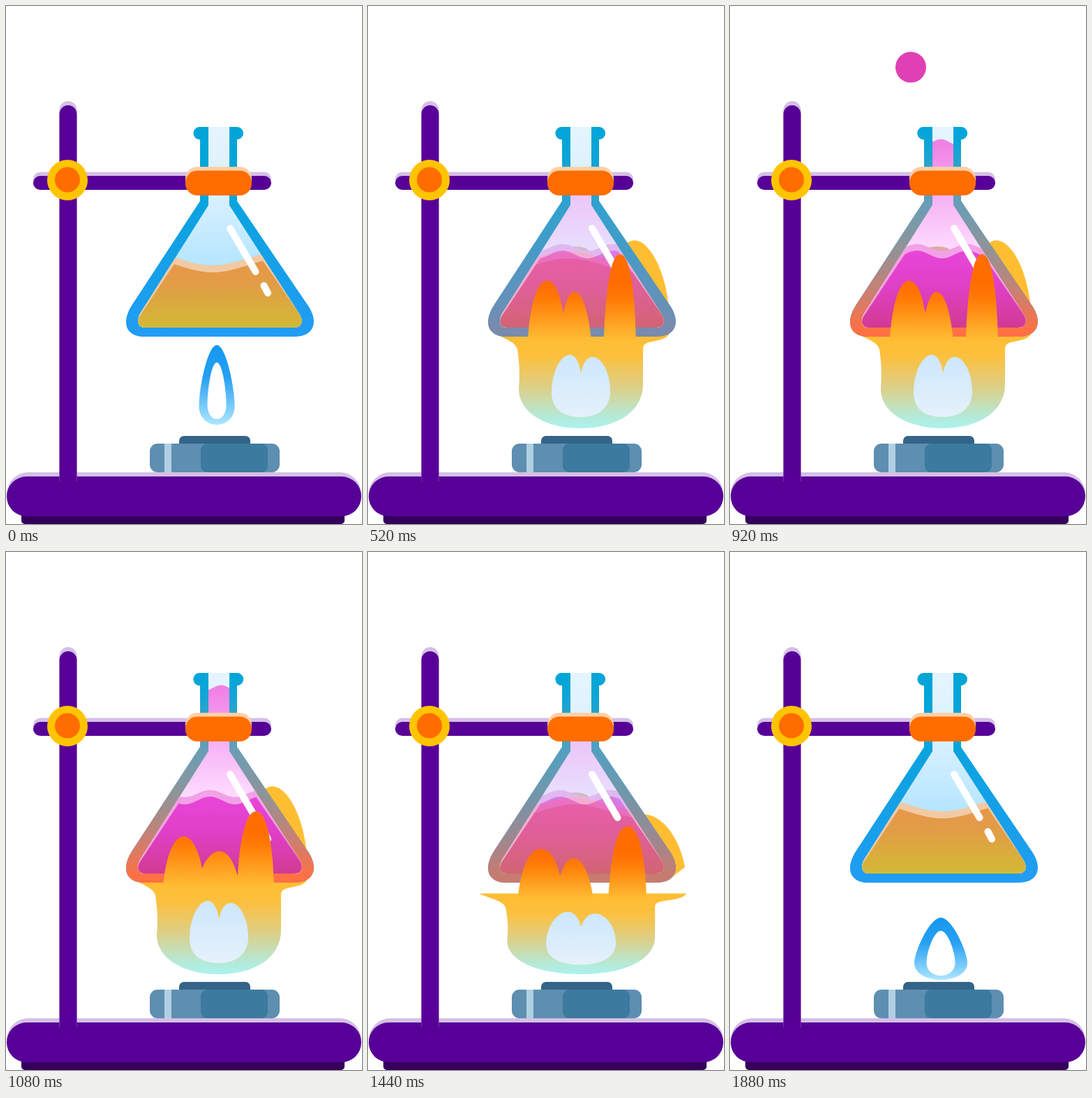
Recreate the animation shown at these times as an HTML page. Size 510x741 px, loop 1.92 s.

```html
<!DOCTYPE html>
<html lang="en">
<head>
<meta charset="utf-8">
<title>Flask over a burner</title>
<style>
html, body { margin: 0; width: 100%; height: 100%; overflow: hidden; background: #fff; }
svg { display: block; width: 100%; height: 100%; }
</style>
</head>
<body>
<svg viewBox="0 0 510 741">
  <defs id="defs">
    <clipPath id="inside"><path d="M290 173H320V285L420 440C427 451 424 460 413 460H199C188 460 187 449 192 440L290 285Z"/></clipPath>
    <clipPath id="core"><path d="M297 285H313L422 443C427 452 424 460 413 460H199C188 460 187 451 192 443Z"/></clipPath>
    <path id="glass" d="M277 173H331A9 9 0 0 1 331 191V279L433 429C449 453 440 473 414 473H198C172 473 164 453 181 427L278 279V191A9 9 0 0 1 277 173Z"/>
  </defs>

  <!-- stand -->
  <rect x="22" y="722" width="463" height="19" rx="5" fill="#34005c"/>
  <rect x="1" y="667" width="508" height="62" rx="31" fill="#d5bfe6"/>
  <rect x="1" y="673" width="508" height="57" rx="28.5" fill="#570097"/>
  <path d="M76.500 680V148.500a12.500 12.500 0 0 1 25 0V680Z" fill="#d5bfe6"/>
  <path d="M76.500 680V154.500a12.500 12.500 0 0 1 25 0V680Z" fill="#570097"/>
  <rect x="39" y="237.500" width="341" height="20" rx="10" fill="#d5bfe6"/>
  <rect x="39" y="243" width="341" height="20" rx="10" fill="#570097"/>
  <circle cx="88" cy="249" r="29" fill="#ffc400"/>
  <circle cx="88" cy="248.500" r="18" fill="#ff6d00"/>

  <!-- burner -->
  <rect x="248" y="615" width="102" height="20" rx="7" fill="#346488"/>
  <rect x="206" y="626" width="186" height="41" rx="11" fill="#5e8fb0"/>
  <rect x="279" y="626" width="96" height="41" rx="9" fill="#3c7aa0"/>
  <rect x="227" y="626" width="10" height="41" fill="#b0cfe3"/>

  <circle id="bubble" fill="#e040b5"/>

  <g id="fireBack">
    <path fill="#ffbe32" d="M368 344C373 334 383 333 393 339C414 354 426 392 430 424L415 440Z"/>
    <path fill="url(#gBody)" d="M182 468H432C424 484 394 475 394 490V541C394 580 357 604 304 604C252 604 216 580 216 548C218 520 216 505 214 491C211 480 196 477 182 468Z"/>
  </g>

  <!-- flask -->
  <use href="#glass" fill="url(#gGlass)"/>
  <use id="hotGlass" href="#glass" fill="url(#gHot)"/>
  <g clip-path="url(#inside)">
    <rect x="180" y="170" width="250" height="300" fill="url(#gAir)"/>
    <path id="rim" fill="#f1caa3"/>
    <path id="liquid" fill="url(#gLiquid)" clip-path="url(#core)"/>
    <g id="hotLiquid">
      <path id="foam" fill="url(#gFoam)"/>
      <ellipse cx="297" cy="352" rx="20" ry="8" fill="#dfa9a4"/>
      <path id="hotRim" fill="#f2a1e7"/>
      <path id="hotCore" fill="url(#gPink)" clip-path="url(#core)"/>
    </g>
  </g>
  <path d="M321 318L357.500 380M369.500 400L375 410.500" stroke="#fff" stroke-width="10" stroke-linecap="round"/>
  <rect x="257" y="230" width="95" height="36" rx="17" fill="#ffd0a6"/>
  <rect x="257" y="235.500" width="95" height="35.500" rx="17" fill="#ff6d00"/>

  <g id="fireFront">
    <path id="tongues" fill="url(#gTongue)"/>
    <path fill="url(#gCore)" d="M263 553C263 524 276 499 289 499C298 499 303 512 305 525C308 512 313 502 322 502C334 502 347 523 347 551C347 574 331 588 305 588C279 588 263 576 263 553Z"/>
  </g>
  <g id="pilot">
    <path id="pilotOut" fill="url(#gPilot)"/>
    <path id="pilotIn" fill="#fff"/>
  </g>
</svg>
<script>
const LOOP = 1920, STEP = 40;
const el = id => document.getElementById(id);
const set = (id, attrs) => { for (const k in attrs) el(id).setAttribute(k, attrs[k]); };
const clamp = v => Math.max(0, Math.min(1, v));

// vertical gradients: id, y1, y2, then offset/colour pairs
const gradients = [
  ['gGlass', 173, 473, 0, '#00a5d6', .3, '#08a4dc', 1, '#229cf4'],
  ['gHot', 173, 473, 0, '#00a6da', .1, '#10a5d6', .37, '#6b9db6', .57, '#8e9499', .8, '#cc7f70', .97, '#ff7043'],
  ['gAir', 173, 373, 0, '#e5f5ff', .5, '#d8f0ff', 1, '#b4e5ff'],
  ['gLiquid', 355, 460, 0, '#e9954a', .4, '#e29c46', 1, '#d2b935'],
  ['gFoam', 190, 350, 0, '#f07de4', .5, '#f6b0f3', 1, '#fedcff'],
  ['gPink', 350, 460, 0, '#e845d8', .45, '#e040c8', 1, '#d23a92'],
  ['gBody', 474, 604, 0, '#ffbd33', .2, '#fdc03d', .55, '#dccf88', .85, '#b7e8d3', 1, '#aaf2f0'],
  ['gTongue', 398, 476, 0, '#ff6d00', .25, '#ff7905', 1, '#ffbb32'],
  ['gCore', 499, 588, 0, '#cce7fd', 1, '#e5f1fa']
];
const defineGradient = ([id, y1, y2, ...stops], units = 'userSpaceOnUse') => {
  let body = '';
  for (let i = 0; i < stops.length; i += 2)
    body += `<stop offset="${stops[i]}" stop-color="${stops[i + 1]}"/>`;
  el('defs').insertAdjacentHTML('beforeend',
    `<linearGradient id="${id}" gradientUnits="${units}" x1="0" x2="0" y1="${y1}" y2="${y2}">${body}</linearGradient>`);
};
gradients.forEach(g => defineGradient(g));
defineGradient(['gPilot', 0, 1, 0, '#1598f0', .4, '#26a0f2', 1, '#ade6ff'], 'objectBoundingBox');

// area below a cosine surface whose lowest point is at x = dip
function surface(level, amp, length, dip) {
  let d = 'M180 480';
  for (let x = 180; x <= 430; x += 3)
    d += `L${x} ${(level + amp * Math.cos(2 * Math.PI * (x - dip) / length)).toFixed(2)}`;
  return d + 'L432 480Z';
}

// drop shape: top, bottom, half width, height of widest point, tip softness, shoulder
function drop([top, bottom, w, wide, tip, shoulder]) {
  const c = 302, low = bottom - (bottom - wide) * .45;
  return `M${c} ${top}C${c + tip} ${top} ${c + w} ${wide - shoulder} ${c + w} ${wide}` +
    `C${c + w} ${low} ${c + w * .6} ${bottom} ${c} ${bottom}` +
    `C${c - w * .6} ${bottom} ${c - w} ${low} ${c - w} ${wide}` +
    `C${c - w} ${wide - shoulder} ${c - tip} ${top} ${c} ${top}Z`;
}
const pilotPoses = [
  [[485, 599, 25.5, 573, 13, 28], [510, 591, 13.5, 571, 8, 22]],
  [[498, 608, 25.5, 563, 15, 34], [522, 601, 15, 568, 9, 26]],
  [[523, 612, 38, 579, 22, 28], [542, 606, 23, 578, 14, 19]],
  [[523, 612, 38, 588, 16, 16], [542, 606, 20.5, 588, 10, 16]]
].map(pose => pose.map(drop));

const tonguePoses = [
  'M225 478C228 444 238 407 254 407C268 407 277 430 281 453C286 440 295 428 306 428C319 428 328 447 332 465C334 420 342 371 358 371C375 371 383 425 384 478Z',
  'M229 478C231 440 240 393 256 393C270 393 276 418 280 440C283 424 288 409 296 409C309 409 317 447 320 478ZM338 478C340 420 346 355 361 355C377 355 383 420 384 478Z'
];

// time, width scale, height scale
const fireKeys = [[440, .3, .2], [520, 1, 1], [1360, 1, 1], [1440, 1.19, .85], [1520, .3, .2]];
function fireScale(t) {
  const i = fireKeys.findIndex(k => t < k[0]);
  if (i < 1) return null;
  const [t0, ...a] = fireKeys[i - 1], [t1, ...b] = fireKeys[i];
  return a.map((v, n) => v + (b[n] - v) * (t - t0) / (t1 - t0));
}

// start, end, sideways drift, radius
const bubbles = [[540, 740, -18, 19], [840, 1040, -46, 22], [1100, 1180, -10, 21]];

function draw(t) {
  const dip = 296 - t * 200 / 960;
  set('rim', { d: surface(361, 10, 200, dip) });
  set('liquid', { d: surface(371, 10, 200, dip) });

  const heat = Math.min(clamp((t - 440) / 120), clamp((1520 - t) / 120));
  const hotDip = 267 + (t - 680) * .153;
  set('hotGlass', { opacity: Math.min(clamp((t - 440) / 200), clamp((1560 - t) / 160)) });
  set('hotLiquid', { opacity: heat });
  set('foam', { d: surface(195 + 160 * (1 - heat), 4.5, 52, 276 + Math.sin((t - 920) / 100) * 6) });
  set('hotRim', { d: surface(345.5, 5, 72, hotDip) });
  set('hotCore', { d: surface(355.5, 5.5, 72, hotDip) });

  const scale = fireScale(t);
  for (const id of ['fireBack', 'fireFront'])
    set(id, {
      visibility: scale ? 'visible' : 'hidden',
      transform: `translate(304 604) scale(${scale || 1}) translate(-304 -604)`
    });
  set('tongues', { d: tonguePoses[Math.floor(t / 160) % 2] });

  const [outer, inner] = pilotPoses[Math.floor(t / 120) % 4];
  set('pilot', { visibility: scale ? 'hidden' : 'visible' });
  set('pilotOut', { d: outer });
  set('pilotIn', { d: inner });

  const live = bubbles.find(b => t >= b[0] && t < b[1]);
  if (live) {
    const age = t - live[0], grow = clamp(age / 80);
    set('bubble', { cx: 305 + live[2] * grow, cy: 170 - age * 1.03, r: live[3] * grow });
  } else set('bubble', { r: 0 });
}

const start = performance.now();
function tick() {
  const t = (performance.now() - start) % LOOP;
  draw(Math.floor(t / STEP) * STEP);
  requestAnimationFrame(tick);
}
tick();
</script>
</body>
</html>
```
